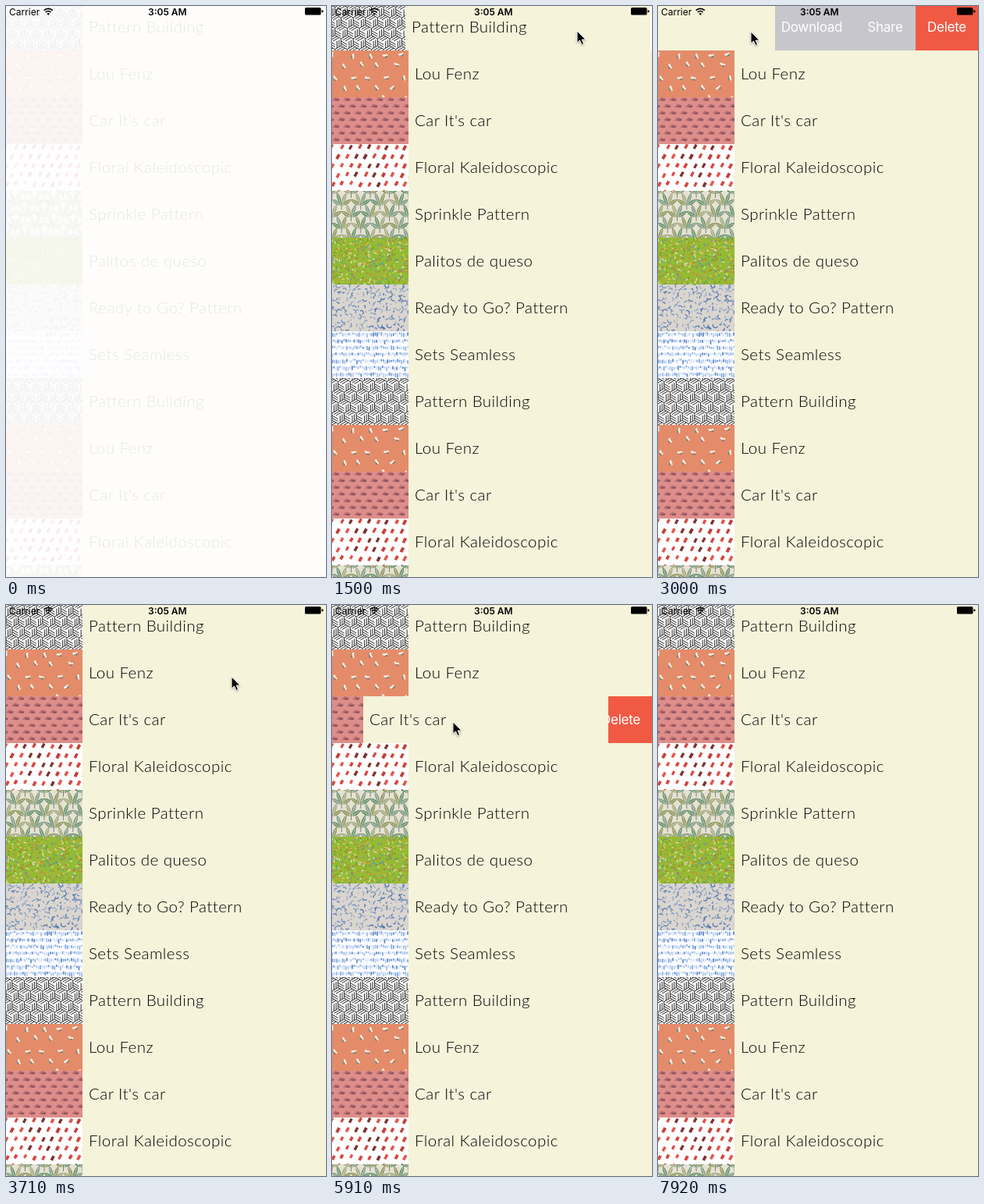
Animation of 410 by 732 pixels, one loop 9200 ms. Source, as an HTML page with a canvas:

```html
<!DOCTYPE html>
<html lang="en">
<head>
<meta charset="utf-8">
<title>Swipe actions list</title>
<style>
  html, body { margin: 0; width: 100%; height: 100%; overflow: hidden; background: #fff; }
  #stage { position: relative; width: 410px; height: 732px; overflow: hidden; background: #fff; }
  #list { position: absolute; inset: 0; }
  .row { position: absolute; left: 0; width: 410px; height: 60px; overflow: hidden; background: #fff; }
  .cell { position: absolute; inset: 0 -2px 0 0; background: #f5f3da; }
  .cell canvas { position: absolute; left: 0; top: 0; }
  .cell span {
    position: absolute; left: 106px; top: -1px; white-space: nowrap;
    font: 300 20.5px/60px Lato, sans-serif; letter-spacing: .45px; color: #000;
  }
  .acts { position: absolute; inset: 0; color: #fff; font: 400 17px/60px Inter, sans-serif; letter-spacing: -.25px; }
  .acts b { position: absolute; top: 0; height: 60px; font-weight: 400; text-align: center; background: #c7c6cc; }
  .acts b:last-child { background: #f05a44; }
  #bar { position: absolute; left: 0; top: 0; width: 410px; height: 16px; font: 400 12px/15px Inter, sans-serif; color: #000; }
  #bar span { position: absolute; left: 4px; top: 0; }
  #bar .time { left: 182px; font-weight: 600; }
  svg { position: absolute; left: 0; top: 0; overflow: visible; }
</style>
</head>
<body>
<div id="stage">
  <div id="list"></div>
  <div id="bar">
    <span>Carrier</span><span class="time">3:05 AM</span>
    <svg width="410" height="16">
      <path d="M48.6 5.6a8 8 0 0 1 11.2 0M50.8 8a5 5 0 0 1 6.800 0" fill="none" stroke="#000" stroke-width="1.7"/>
      <path d="M52.3 9.8a2.8 2.8 0 0 1 3.8 0L54.2 11.8z"/>
      <rect x="383" y="2" width="20.5" height="9.5" rx="1.5"/>
      <path d="M404.5 5.2h.6a1.5 1.5 0 0 1 0 3h-.6z"/>
    </svg>
  </div>
  <svg id="cursor" width="14" height="20">
    <path d="M0 0V15L3.5 12L6 17.5L8.500 16.500L6.200 11H11z" fill="#000" stroke="#fff" stroke-linejoin="round"
      style="filter:drop-shadow(0 1px 1px rgba(0,0,0,.35))"/>
  </svg>
</div>
<script>
const W = 98, H = 60, LOOP = 9200, STEP = 88, OPEN = -270;

function random(seed) {
  return () => (seed = (seed * 16807) % 2147483647) / 2147483647;
}

function fill(g, color) {
  g.fillStyle = color;
  g.fillRect(0, 0, W, H);
}

// Staggered grid: calls draw(x, y, row, column) beyond every edge of the thumb.
function grid(dx, dy, shift, draw) {
  for (let r = 0; r * dy < H + 2 * dy; r++)
    for (let c = 0; c * dx < W + 2 * dx; c++) draw(c * dx - (r % 2) * shift, r * dy, r, c);
}

function at(g, x, y, angle, draw) {
  g.save();
  g.translate(x, y);
  g.rotate(angle);
  draw();
  g.restore();
}

function blob(g, color, x, y, rx, ry) {
  g.fillStyle = color;
  g.beginPath();
  g.ellipse(x, y, rx, ry, 0, 0, 7);
  g.fill();
}

function line(g, color, width, x1, y1, x2, y2) {
  g.strokeStyle = color;
  g.lineWidth = width;
  g.beginPath();
  g.moveTo(x1, y1);
  g.lineTo(x2, y2);
  g.stroke();
}

function hexes(g) {
  const R = 9;
  fill(g, '#fbfbfb');
  grid(R * Math.sqrt(3), R * 1.5, R * Math.sqrt(3) / 2, (x, y) => {
    for (let k = 0; k < 3; k++) {
      const a = Math.PI * (k * 2 / 3 + 1 / 6), b = a + Math.PI * 2 / 3;
      for (let s = 0; s < R; s += R / 3) {
        const px = x + s * Math.cos(a), py = y + s * Math.sin(a);
        line(g, '#2c2c2c', 1, px, py, px + R * Math.cos(b), py + R * Math.sin(b));
      }
    }
  });
}

function petals(g) {
  const rnd = random(41);
  fill(g, '#e48c69');
  grid(22, 14, 11, (x, y) => at(g, x + rnd() * 6, y + 3 + rnd() * 5, rnd() * 2.4 - .6, () => {
    blob(g, '#77817a', 1, 1.3, 2.6, 1.2);
    blob(g, '#f6efe2', -1, 0, 2.5, 1.4);
    blob(g, '#fbf6ec', 2, -1, 1.4, 1);
  }));
}

function cars(g) {
  fill(g, '#de8e8a');
  grid(14, 8.6, 7, (x, y, r) => {
    g.fillStyle = r % 2 ? '#b06a70' : '#bb6c70';
    g.beginPath();
    g.moveTo(x, y + 4);
    g.lineTo(x + 4, y);
    g.lineTo(x + 10, y + 2);
    g.lineTo(x + 8, y + 5);
    g.fill();
    g.fillStyle = '#85525e';
    g.fillRect(x + 4, y + 2.5, 5, 1.7);
  });
}

function dabs(g) {
  const rnd = random(9), reds = ['#d4473f', '#7d332f', '#c2403a', '#e0584d'];
  fill(g, '#fffefe');
  grid(11.6, 11.8, 4, (x, y) => at(g, x + rnd() * 2, y + 3 + rnd() * 2, .5, () => {
    g.fillStyle = reds[rnd() * 4 | 0];
    g.fillRect(-2, -3, 3 + rnd(), 5 + rnd() * 2);
  }));
}

function leaf(g, color, len, wide) {
  g.fillStyle = color;
  g.beginPath();
  g.moveTo(0, 0);
  g.quadraticCurveTo(-wide, -len * .6, 0, -len);
  g.quadraticCurveTo(wide, -len * .6, 0, 0);
  g.fill();
  line(g, '#dfe0cf', .7, 0, 0, 0, -len * .85);
}

function leaves(g) {
  const greens = ['#66906a', '#a3aa80', '#7f9c87', '#8c965f'];
  fill(g, '#e6e2d3');
  grid(24.5, 15, 12.25, (x, y, r, c) => {
    for (let i = 0; i < 4; i++)
      at(g, x, y + 4, [-1, 1, -.35, .35][i], () => leaf(g, greens[(i + r + c) % 4], 15 + (i > 1) * 3, 4.5));
    line(g, '#6a7f62', .9, x, y, x, y + 9);
  });
}

function sprinkles(g) {
  const rnd = random(77), hues = ['#e9e6cc', '#c96a45', '#d99a48', '#5b9fa8', '#d8cf55', '#6d9c2c', '#a98a3c'];
  fill(g, '#93bb34');
  for (let i = 0; i < 420; i++)
    at(g, rnd() * W, rnd() * H, rnd() * 3.14, () => line(g, hues[rnd() * 7 | 0], 1.2, -1.6, 0, 1.6, 0));
}

function squiggles(g) {
  const rnd = random(23), blues = ['#4a72ad', '#6c8ebe', '#90a6c6'];
  fill(g, '#dad5cf');
  grid(6.2, 5.6, 3, (x, y) => {
    const a = rnd() * 6.3;
    g.strokeStyle = blues[rnd() * 3 | 0];
    g.lineWidth = 1.2;
    g.beginPath();
    g.arc(x + rnd() * 3, y + rnd() * 3, 1 + rnd() * 2.4, a, a + 1 + rnd() * 2.2);
    g.stroke();
  });
}

function strokes(g) {
  const rnd = random(58), blues = ['#7fa6dc', '#b7cdee', '#5c86c6', '#9cbbe6', '#dbe6f7'];
  fill(g, '#fbfcff');
  grid(2.6, 8.6, 1, (x, y) => {
    g.fillStyle = blues[rnd() * 5 | 0];
    g.fillRect(x, y + 1 + rnd() * 2, 1.7, 2 + rnd() * 3.5);
  });
}

const ITEMS = [
  ['Pattern Building', hexes], ['Lou Fenz', petals], ["Car It's car", cars], ['Floral Kaleidoscopic', dabs],
  ['Sprinkle Pattern', leaves], ['Palitos de queso', sprinkles], ['Ready to Go? Pattern', squiggles], ['Sets Seamless', strokes]
];
const ACTIONS = '<div class="acts"><b style="left:142px;width:110px">Download</b>' +
  '<b style="left:252px;width:78px">Share</b><b style="left:330px;width:80px">Delete</b></div>';

const list = document.getElementById('list');
const cursor = document.getElementById('cursor');

// Drag begins at step grab with the pointer at x; timings are in steps.
const SWIPES = [
  { grab: 17, x: 318, release: 24, close: 34 },
  { grab: 45, x: 312, release: 51, close: 57 },
  { grab: 65, x: 213, release: 71, close: 80 }
];
// Pointer stops: step, x, y.
const STOPS = [
  [7, 404, 352], [17, 314, 32], [27, 169, 38], [28, 169, 38], [31, 119, 33], [34, 119, 33], [42, 289, 92],
  [44, 312, 91], [54, 95, 90], [57, 95, 90], [64, 217, 150], [67, 155, 150], [75, 70, 150], [80, 70, 150], [90, 420, 150]
];

function addRow(i) {
  const [name, paint] = ITEMS[i % ITEMS.length];
  const row = document.createElement('div');
  row.className = 'row';
  row.style.top = i * H - 3 + 'px';
  row.innerHTML = (SWIPES[i] ? ACTIONS : '') +
    `<div class="cell"><canvas width="${W}" height="${H}"></canvas><span>${name}</span></div>`;
  paint(row.querySelector('canvas').getContext('2d'));
  list.append(row);
  return row;
}
const rows = Array.from({ length: 13 }, (_, i) => addRow(i));

const clamp = v => Math.max(0, Math.min(1, v));
const mix = (a, b, t) => a + (b - a) * t;
const smooth = v => (v = clamp(v), v * v * (3 - 2 * v));
const easeOut = v => 1 - (1 - clamp(v)) ** 2;

function pointer(k) {
  const i = Math.max(1, STOPS.findIndex(s => s[0] >= k));
  const [k0, x0, y0] = STOPS[i - 1], [k1, x1, y1] = STOPS[i];
  const t = smooth((k - k0) / (k1 - k0));
  return [mix(x0, x1, t), mix(y0, y1, t)];
}

function offset(k, { grab, x, release, close }) {
  if (k < grab) return 0;
  if (k >= close) return OPEN * (1 - smooth((k - close + .6) / 6));
  const drag = Math.min(0, pointer(Math.min(k, release))[0] - x);
  return mix(drag, OPEN, easeOut((k - release) / 3));
}

function draw(time) {
  const k = Math.floor(time % LOOP / STEP);
  list.style.opacity = mix(.09, 1, clamp(k / 4));
  SWIPES.forEach((swipe, i) => {
    const x = Math.round(offset(k, swipe));
    rows[i].querySelector('.cell').style.transform = `translateX(${x}px)`;
    rows[i].querySelector('.acts').style.visibility = x < -5 ? 'visible' : 'hidden';
  });
  const shown = k >= 7 && k < 90;
  cursor.style.visibility = shown ? 'visible' : 'hidden';
  if (shown) {
    const [x, y] = pointer(k).map(Math.round);
    cursor.style.transform = `translate(${x}px, ${y}px)`;
  }
}

const start = performance.now();
function tick() {
  draw(performance.now() - start);
  requestAnimationFrame(tick);
}
tick();
</script>
</body>
</html>
```
